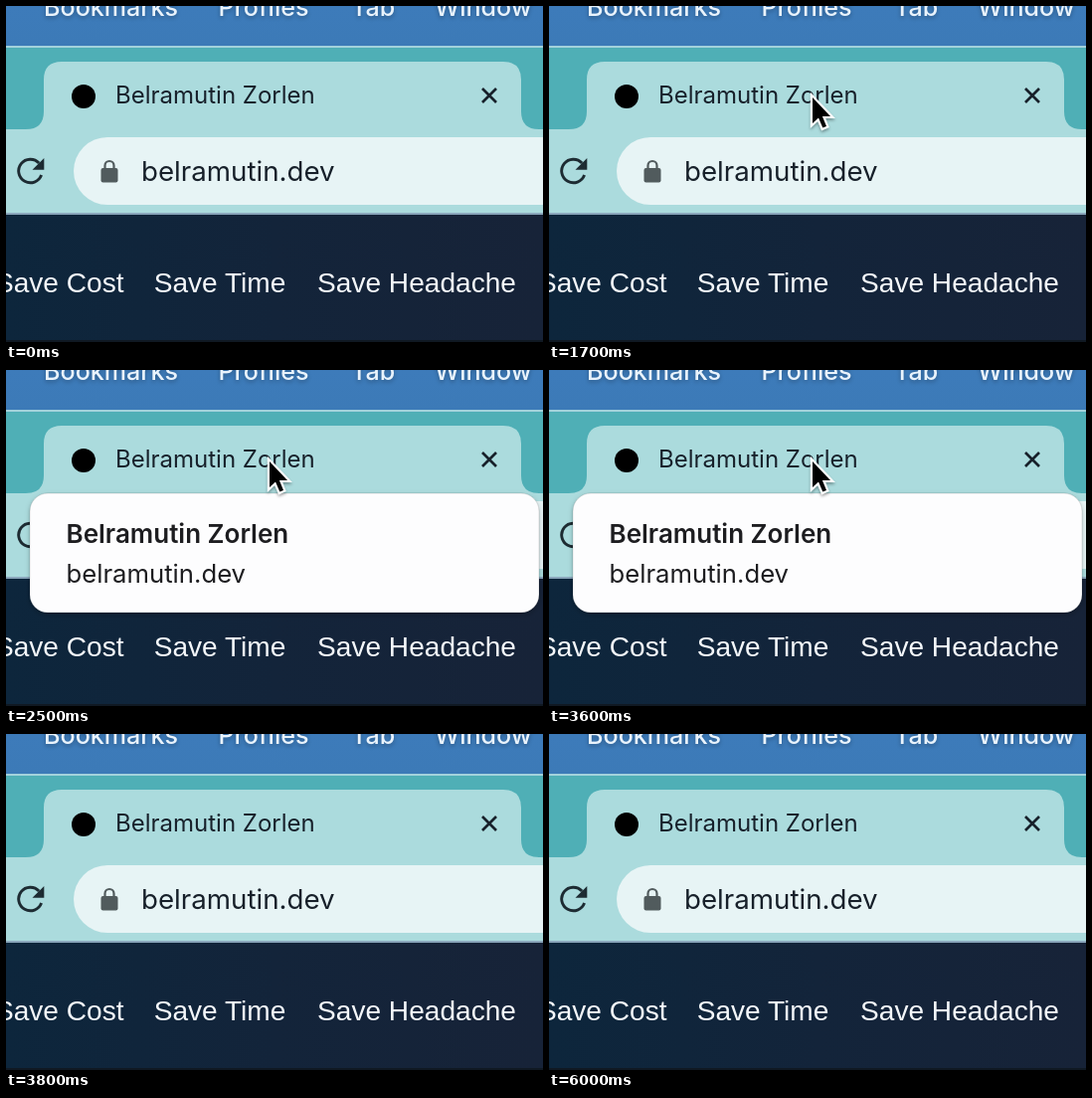
Animation of 540 by 338 pixels, one loop 6.1 s. Source, as an HTML page:

```html
<!DOCTYPE html>
<html lang="en">
<head>
<meta charset="utf-8">
<title>Tab hover card</title>
<style>
  html, body { margin: 0; width: 100%; height: 100%; overflow: hidden; background: #13243a; }
  svg { display: block; width: 100%; height: 100%; }
  text { font-family: Inter, "Open Sans", sans-serif; fill: #17202a; }
  .menu text { font-size: 25.1px; font-weight: 500; fill: #e9f3fc; text-shadow: 0 2px 4px #0004; }
  .page text { font-family: "Liberation Sans", Arial, sans-serif; font-size: 28.1px; fill: #f4f7fa; }
  #card text { fill: #1d1d20; }
</style>
</head>
<body>
<svg viewBox="0 0 540 338" preserveAspectRatio="none">
  <defs>
    <linearGradient id="menuFill" x2="0" y2="1">
      <stop stop-color="#3d7bba"/><stop offset="1" stop-color="#3c7ab7"/>
    </linearGradient>
    <linearGradient id="pageFill">
      <stop stop-color="#0d263c"/><stop offset=".5" stop-color="#13243a"/><stop offset="1" stop-color="#172338"/>
    </linearGradient>
    <filter id="soft" x="-20%" y="-20%" width="140%" height="150%">
      <feDropShadow dx="0" dy="2" stdDeviation="2.5" flood-opacity=".25"/>
    </filter>
    <filter id="cursorShadow" x="-50%" y="-50%" width="200%" height="200%">
      <feDropShadow dx="0" dy="2" stdDeviation="1.5" flood-opacity=".35"/>
    </filter>
  </defs>

  <g class="menu">
    <rect width="540" height="41" fill="url(#menuFill)"/>
    <text x="38" y="10">Bookmarks</text>
    <text x="213.5" y="10">Profiles</text>
    <text x="347" y="10">Tab</text>
    <text x="431" y="10">Window</text>
  </g>

  <rect y="40" width="540" height="2" fill="#a3d2dc"/>
  <rect y="42" width="540" height="83" fill="#4fafb6"/>
  <path fill="#abdbdd" d="M0 124H20Q38 124 38 106V74Q38 56 56 56H500Q518 56 518 74V106Q518 124 536 124H540V209H0Z"/>
  <circle cx="78" cy="91" r="12" fill="#000"/>
  <text x="110" y="98" font-size="24">Belramutin Zorlen</text>
  <path d="M479 83L493 97M493 83L479 97" stroke="#17202a" stroke-width="2.7"/>

  <path d="M35.6 170A11.8 11.8 0 1 1 33.2 158" fill="none" stroke="#1d2b32" stroke-width="2.9"/>
  <path d="M38.3 153V164.8H26.5Z" fill="#1d2b32"/>
  <rect x="68" y="132" width="560" height="68" rx="34" fill="#e7f4f5"/>
  <rect id="barHover" x="68" y="132" width="560" height="68" rx="34" fill="#dfebeb" opacity="0"/>
  <rect x="95.5" y="163" width="17" height="14.5" rx="2" fill="#515b5d"/>
  <path d="M99.5 164V160.5a4.5 4.5 0 0 1 9 0V164" fill="none" stroke="#515b5d" stroke-width="2.2"/>
  <text x="136" y="176" font-size="27.7">belramutin.dev</text>

  <g class="page">
    <rect y="209" width="540" height="129" fill="url(#pageFill)"/>
    <rect y="208" width="540" height="2" fill="#8aa6bb"/>
    <rect y="336" width="540" height="2" fill="#101923"/>
    <text x="118.5" y="288" text-anchor="end">Save Cost</text>
    <text x="215" y="288" text-anchor="middle">Save Time</text>
    <text x="413" y="288" text-anchor="middle">Save Headache</text>
  </g>

  <g id="card" opacity="0">
    <rect x="24" y="124" width="512" height="120" rx="18" fill="#fdfdfe" stroke="#000" stroke-opacity=".12" filter="url(#soft)"/>
    <text x="60.5" y="174" font-size="26" font-weight="600">Belramutin Zorlen</text>
    <text x="60.5" y="214" font-size="25.7">belramutin.dev</text>
  </g>

  <g id="cursor" visibility="hidden" filter="url(#cursorShadow)">
    <path d="M0 0V26L6 20.5L10.3 30.5L14 28.9L9.9 19H18Z" fill="#000" stroke="#fff" stroke-width="4.2" paint-order="stroke"/>
  </g>
</svg>
<script>
  const LOOP = 6100, TICK = 100;
  const [card, cursor, barHover] = ["card", "cursor", "barHover"].map(id => document.getElementById(id));

  // Each row: time in ms, then values; linear between rows.
  const PATH = [[500, 420, 288], [600, 377, 235], [700, 340, 182], [800, 312, 140],
                [900, 298, 117], [1000, 284, 106], [1100, 272, 97], [1300, 264, 90]];
  const CARD = [[2100, 0], [2200, .35], [2300, .69], [2400, .9], [2500, 1], [3600, 1], [3700, .4], [3800, 0]];
  const HOVER = [[600, 0], [800, 1], [900, 1], [1200, 0]];

  function sample(rows, t) {
    const next = rows.findIndex(row => row[0] > t);
    if (next === 0) return rows[0].slice(1);
    if (next < 0) return rows[rows.length - 1].slice(1);
    const a = rows[next - 1], b = rows[next];
    const k = (t - a[0]) / (b[0] - a[0]);
    return a.slice(1).map((v, i) => v + (b[i + 1] - v) * k);
  }

  function draw(now) {
    const t = Math.floor((now % LOOP) / TICK) * TICK;
    const [x, y] = sample(PATH, t);
    cursor.setAttribute("transform", `translate(${x + 1} ${y + 2})`);
    cursor.setAttribute("visibility", t >= 500 && t < 3700 ? "visible" : "hidden");
    card.setAttribute("opacity", sample(CARD, t)[0]);
    barHover.setAttribute("opacity", sample(HOVER, t)[0]);
  }

  const start = performance.now();
  function frame() {
    draw(performance.now() - start);
    requestAnimationFrame(frame);
  }
  frame();
</script>
</body>
</html>
```
